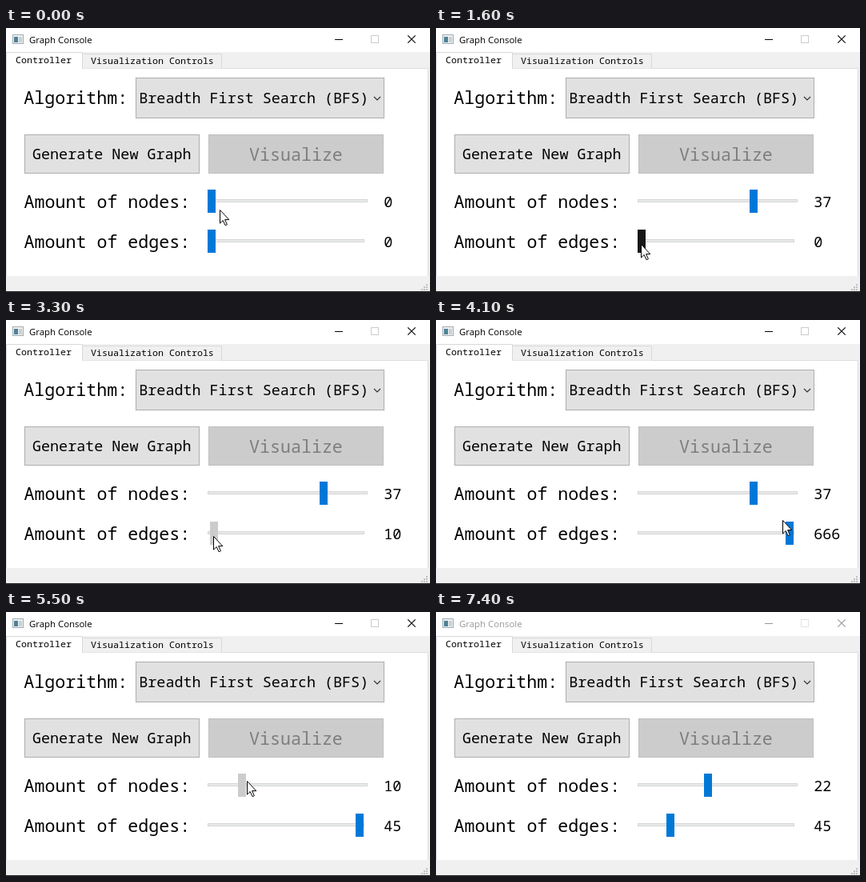
Write an HTML page that moves like this. It is 530 px wide and 330 px high and loops after 7.5 s.

```html
<!DOCTYPE html>
<html lang="en">
<head>
<meta charset="utf-8">
<title>Graph Console</title>
<style>
  html, body { margin: 0; width: 100%; height: 100%; overflow: hidden; background: #f0f0f0; }
  svg { display: block; width: 530px; height: 330px; }
  text { white-space: pre; fill: #000; }
  .big, .mid, .tab { font-family: "Noto Sans Mono", "DejaVu Sans Mono", monospace; }
  .big { font-size: 21.65px; }
  .mid { font-size: 18.4px; }
  .tab { font-size: 11.67px; }
  .title { font: 11.4px "Open Sans", "Noto Sans", sans-serif; fill: currentColor; }
  .box { fill: #e1e1e1; stroke: #adadad; }
  .off { fill: #ccc; stroke: #bfbfbf; }
  .groove { fill: #e7eaea; stroke: #d6d6d6; }
  .line { fill: none; stroke: currentColor; }
</style>
</head>
<body>
<svg viewBox="0 0 530 330">
  <rect width="530" height="330" fill="#f0f0f0"/>
  <rect width="530" height="30" fill="#fff"/>

  <!-- title bar -->
  <rect x="8.5" y="8.5" width="13" height="11" fill="#eef1f3" stroke="#a3abb0"/>
  <rect x="10" y="11" width="5" height="7" fill="#4f8199"/>
  <rect x="16" y="11" width="4" height="7" fill="#c9d0d4"/>
  <g id="bar">
    <text class="title" x="29" y="19">Graph Console</text>
    <path class="line" d="M411 14.5h10"/>
    <path class="line" stroke-width="1.2" d="M502.3 9.3l9.4 9.4m0-9.4l-9.4 9.4"/>
  </g>
  <rect id="max" x="456.5" y="9.5" width="9" height="9" fill="none"/>

  <!-- tabs and page -->
  <rect y="50" width="528" height="260" fill="#fff"/>
  <path d="M.5 310V50.5H527.5V310" fill="none" stroke="#dcdcdc"/>
  <path d="M95.5 50.5V32.5H269.5V50.5" fill="#f0f0f0" stroke="#d9d9d9"/>
  <path d="M.5 51V30.5H95.5V51" fill="#fff" stroke="#d9d9d9"/>
  <text class="tab" x="12" y="44">Controller</text>
  <text class="tab" x="106" y="45">Visualization Controls</text>

  <text class="big" x="22.3" y="95">Algorithm:</text>
  <rect class="box" x="162.5" y="62.5" width="310" height="50"/>
  <text class="mid" x="166.3" y="94">Breadth First Search (BFS)</text>
  <path d="M460 86l4 4l4-4" fill="none" stroke="#333" stroke-width="1.2"/>

  <rect class="box" x="23.5" y="133.5" width="218" height="48"/>
  <text class="mid" x="33" y="164">Generate New Graph</text>
  <rect class="off" x="253.5" y="133.5" width="218" height="48"/>
  <text class="big" x="304" y="165.5" style="fill:#7e7e7e">Visualize</text>

  <text class="big" x="22.5" y="225">Amount of nodes:</text>
  <rect class="groove" x="252.5" y="214.5" width="199" height="3"/>
  <rect id="nodeGrip" y="202" width="10" height="29"/>
  <text class="mid" id="nodeText" x="472.3" y="224"></text>

  <text class="big" x="22.5" y="275">Amount of edges:</text>
  <rect class="groove" x="252.5" y="264.5" width="195" height="3"/>
  <rect id="edgeGrip" y="252" width="10" height="29"/>
  <text class="mid" id="edgeText" x="472.3" y="274"></text>

  <!-- size grip and lower edge -->
  <path d="M525 320h2v2h-2zM522 323h2v2h-2zM525 323h2v2h-2zM519 326h2v2h-2zM522 326h2v2h-2zM525 326h2v2h-2z" fill="#bfbfbf"/>
  <rect y="329" width="530" height="1" fill="#222"/>

  <path id="cursor" d="M.5 .5v16.6l3.7-3.6l2.9 6.2l2.3-1l-2.8-6.1h5.2z" fill="#fff" stroke="#000"/>
</svg>
<script>
const LOOP = 7500, STEP = 100;
const $ = id => document.getElementById(id);
const within = (v, from, to) => v >= from && v <= to;
const mix = (a, b, k) => a + (b - a) * k;
// Rises evenly from 0 to 1 between two times.
const ramp = (t, from, to) => Math.min(1, Math.max(0, (t - from) / (to - from)));

// Dragged up, back down past the wanted value, then up a little.
const nodesAt = t => Math.round(
  37 * ramp(t, 300, 1200) - 27 * ramp(t, 4600, 5400) + 12 * ramp(t, 5500, 5900));

const maxEdges = nodes => nodes * (nodes - 1) / 2;

// One page step of 10, then a drag to the end; fewer nodes cut the value down.
function edgesAt(t) {
  const wanted = (t >= 2000 ? 10 : 0) + 656 * ramp(t, 3300, 3900);
  return Math.round(Math.min(wanted, maxEdges(nodesAt(Math.min(t, 5500)))));
}

// The pointer follows the slider in use and swings between the two.
function pointerAt(t, nodeX, edgeX) {
  const low = ramp(t, 1300, 1600) - ramp(t, 3900, 4350);
  const side = 1 - (1 - low) ** 2;
  const arrive = 1 - ramp(t, 0, 200);
  const leave = ramp(t, 6100, 6300);
  const onNodes = nodeX + 6 + 5 * ramp(t, 4600, 5400);
  const x = mix(onNodes, edgeX + 4, side) + 9 * arrive - 310 * leave;
  const y = mix(225 - 14 * ramp(t, 4100, 4600), 270, low) + 2 * arrive + 38 * leave;
  return [Math.round(x), Math.round(y)];
}

function drawGrip(el, x, dragged, [px, py]) {
  const top = +el.getAttribute("y");
  const hover = within(px, x, x + 11) && within(py, top, top + 29);
  el.setAttribute("x", x);
  el.setAttribute("fill", dragged ? "#ccc" : hover ? "#171717" : "#0078d7");
}

function draw(t) {
  const nodes = nodesAt(t), edges = edgesAt(t);
  const nodeX = Math.round(252 + 3.78 * nodes);
  const edgeX = Math.round(252 + 185 * edges / Math.max(maxEdges(nodes), 1));
  const pointer = t < 6400 ? pointerAt(t, nodeX, edgeX) : [-50, -50];
  const active = t < 7300;

  drawGrip($("nodeGrip"), nodeX, within(t, 300, 1200) || within(t, 4600, 6000), pointer);
  drawGrip($("edgeGrip"), edgeX, within(t, 3200, 3900), pointer);
  $("nodeText").textContent = nodes;
  $("edgeText").textContent = edges;
  $("cursor").setAttribute("transform", `translate(${pointer})`);
  $("bar").style.color = active ? "#000" : "#999";
  $("max").setAttribute("stroke", active ? "#ccc" : "#e3e3e3");
}

const start = performance.now();
function tick() {
  const t = (performance.now() - start) % LOOP;
  draw(Math.floor(t / STEP) * STEP);
  requestAnimationFrame(tick);
}
tick();
</script>
</body>
</html>
```
